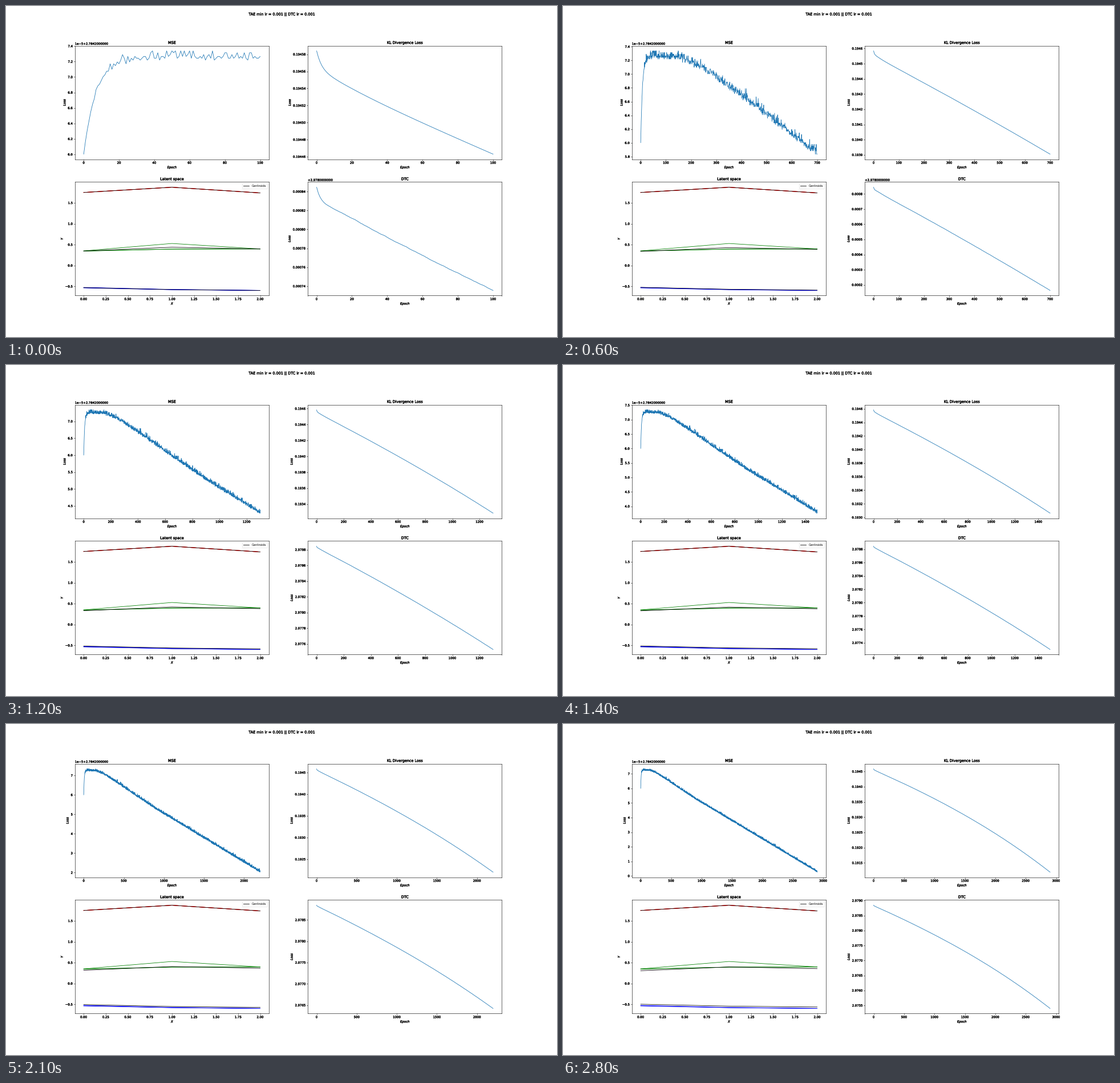
Write a matplotlib script that moves like this. It is 966 by 580 pixels and loops after 2900 ms.

```python
import numpy as np
import matplotlib.pyplot as plt
from matplotlib import patheffects
from matplotlib.animation import FuncAnimation
from matplotlib.ticker import ScalarFormatter

W, H, DPI = 966, 580, 40
S = W / (25 * DPI)          # a 25 inch wide layout scaled to the stage
FRAMES, INTERVAL = 29, 100
EPOCHS_PER_FRAME = 100

plt.rcParams.update({
    "font.family": "DejaVu Sans",
    "font.size": 10 * S,
    "axes.linewidth": 1.1 * S,
    "axes.titlepad": 6 * S,
    "axes.labelpad": 5.5 * S,
    "lines.linewidth": 1.5 * S,
    "patch.linewidth": 1.0 * S,
})
for axis in ("xtick", "ytick"):
    plt.rcParams.update({
        f"{axis}.major.size": 3.5 * S,
        f"{axis}.major.width": 1.1 * S,
        f"{axis}.major.pad": 3.5 * S,
    })

HEAVY = [patheffects.withStroke(linewidth=0.65, foreground="black")]


class LongOffset(ScalarFormatter):
    """Writes the axis offset with ten decimals."""

    def format_data(self, value):
        return f"{value:.10f}" if value > 1 else super().format_data(value)


# ---- loss curves -----------------------------------------------------------

STEP = 0.02384              # float resolution of the error, in units of 1e-5
PEAK = 7.338
TREND = [(0, 7.28), (150, 7.26), (250, 7.10), (400, 6.70),
         (900, 5.31), (2900, 0.31)]


def mse_curve(x):
    rng = np.random.default_rng(4)
    trend = np.interp(x, *zip(*TREND)) - 1.28 * np.exp(-x / 7)
    spikes = rng.uniform(1, 4, x.size) * (rng.random(x.size) < 0.08)
    noise = np.clip(rng.normal(-0.2, 1.4, x.size), -2.2, 3) + spikes
    noise *= np.minimum(x / 20, 1)
    error = np.minimum(trend + STEP * noise, PEAK)
    steps = np.round((PEAK - error) / STEP)
    return 2.7842 + 1e-5 * (PEAK - STEP * steps)


def kl_curve(x):
    slow = 0.8788 * x + 0.5385e-4 * x**2 + 1.454e-8 * x**3
    fast = 20 * np.exp(-x / 2.7) + 13 * np.exp(-x / 28)
    return 0.194551 + 1e-6 * (fast - slow)


def smooth(y):
    padded = np.pad(y, 1, mode="edge")
    return (padded[:-2] + padded[1:-1] + padded[2:]) / 3


epochs = np.arange(FRAMES * EPOCHS_PER_FRAME + 1.0)
mse = mse_curve(epochs)
kl = kl_curve(epochs)
total = kl + smooth(mse)


# ---- latent space ----------------------------------------------------------

# Colour, middle series, spread, extra height of one peak, centroid drift.
CLUSTERS = [
    ("red", (1.749, 1.874, 1.738), 0.001, 0, 0),
    ("green", (0.347, 0.393, 0.396), 0.003, 0.133, -0.041),
    ("blue", (-0.531, -0.577, -0.598), 0.006, 0, 0.035),
]
TAPER = np.array([1, 0.5, 0.2])


def cluster_series(base, spread, peak):
    series = np.array([base + k * spread * TAPER for k in (1, 0, -1)])
    series[0, 1] += peak
    return series


# ---- figure ----------------------------------------------------------------

fig, axes = plt.subplots(2, 2, figsize=(W / DPI, H / DPI), dpi=DPI,
                         facecolor="white")
fig.subplots_adjust(left=0.125, right=0.9, bottom=0.125, top=0.88,
                    wspace=0.2, hspace=0.2)
fig.suptitle("TAE min lr = 0.001 || DTC lr = 0.001", y=0.9785,
             fontsize=12 * S).set_path_effects(HEAVY)
(ax_mse, ax_kl), (ax_latent, ax_total) = axes


def label(ax, title, xlabel, ylabel):
    ax.set_title(title, path_effects=HEAVY)
    ax.set_xlabel(xlabel, style="italic", path_effects=HEAVY)
    ax.set_ylabel(ylabel, style="italic", path_effects=HEAVY)


def add_loss(ax, title, data):
    label(ax, title, "Epoch", "Loss")
    ax.yaxis.set_major_formatter(LongOffset())
    line, = ax.plot([], [], color="#1f77b4")
    return ax, line, data


losses = [add_loss(ax_mse, "MSE", mse),
          add_loss(ax_kl, "KL Divergence Loss", kl),
          add_loss(ax_total, "DTC", total)]

label(ax_latent, "Latent space", "X", "Y")
centroids = []
for color, base, spread, peak, drift in CLUSTERS:
    series = cluster_series(base, spread, peak)
    ax_latent.plot(range(3), series.T, color=color)
    mean = series.mean(axis=0)
    line, = ax_latent.plot(range(3), mean, color="black", zorder=3)
    centroids.append((line, mean, drift))
ax_latent.set_ylim(-0.7217, 1.9987)
ax_latent.legend([centroids[0][0]], ["Centroids"], loc="upper right")


def thicken_ticks(ax):
    for axis in (ax.xaxis, ax.yaxis):
        for text in [*axis.get_ticklabels(), axis.get_offset_text()]:
            text.set_path_effects(HEAVY)


def update(i):
    n = (i + 1) * EPOCHS_PER_FRAME + 1
    for ax, line, data in losses:
        line.set_data(epochs[:n], data[:n])
        ax.relim()
        ax.autoscale_view()
    for line, start, drift in centroids:
        line.set_ydata(start + drift * i / (FRAMES - 1))
    for ax in axes.flat:
        thicken_ticks(ax)
    return []


anim = FuncAnimation(fig, update, frames=FRAMES, interval=INTERVAL,
                     repeat=True, repeat_delay=0, blit=False)
plt.show()
```
